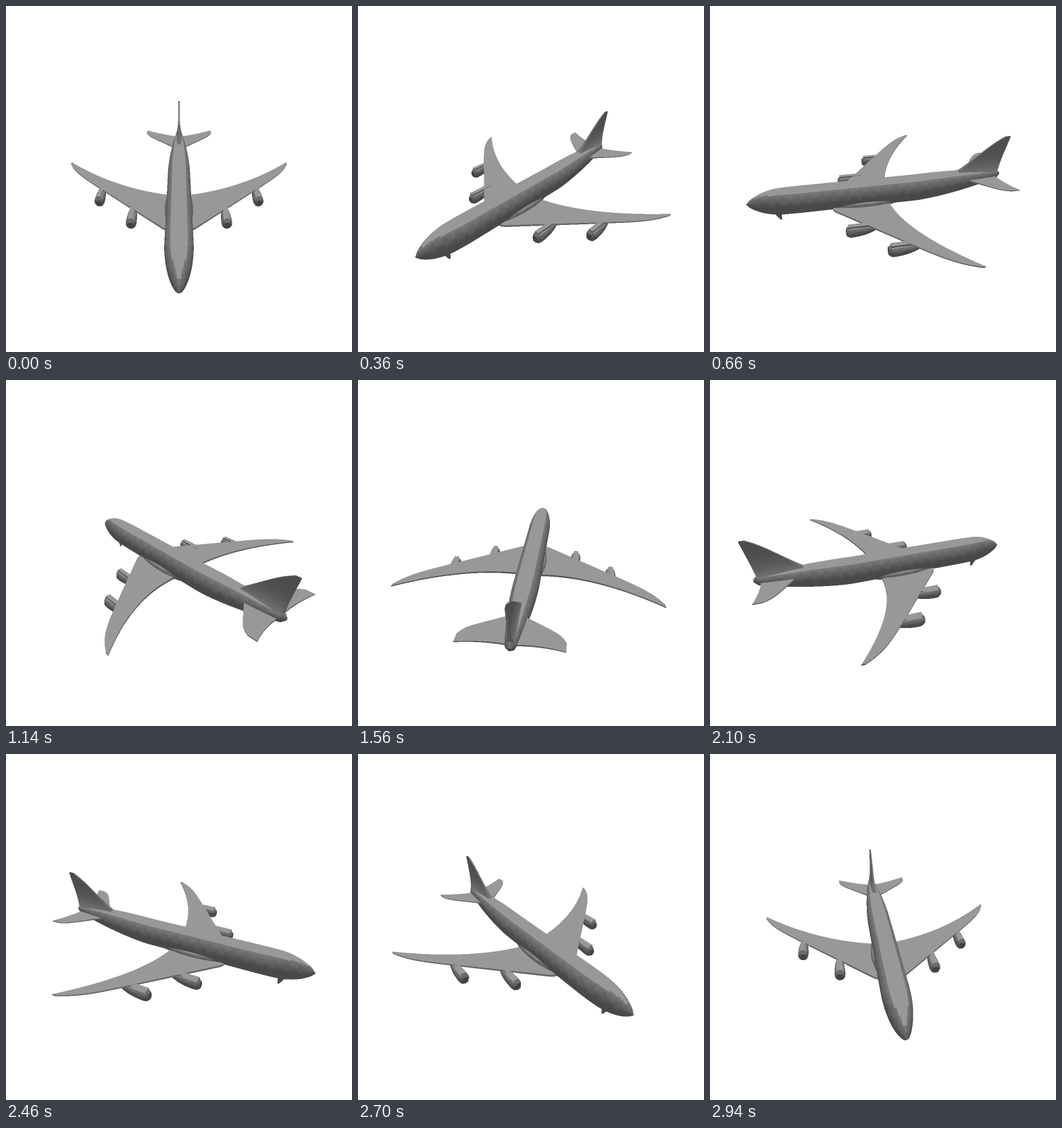
An HTML page with a canvas for the animation above (3000 ms loop, 512 px wide and 512 px high).

```html
<!DOCTYPE html>
<html>
<head>
<meta charset="utf-8">
<style>
html, body { margin: 0; height: 100%; overflow: hidden; background: #fff; }
canvas { display: block; width: 512px; height: 512px; }
</style>
</head>
<body>
<canvas id="stage" width="1024" height="1024"></canvas>
<script>
const SIZE = 1024, FOCAL = 1090, DIST = 2.75, TILT = 31 * Math.PI / 180;
const SIN_T = Math.sin(TILT), COS_T = Math.cos(TILT);
const LIGHT = 152, DARK = 72;
const ctx = document.getElementById('stage').getContext('2d');
const image = ctx.createImageData(SIZE, SIZE);
const pixels = new Uint32Array(image.data.buffer);
const near = new Float32Array(SIZE * SIZE);
const faces = [];

// Points are [forward, sideways, up].
const quad = (shade, ...pts) => faces.push({ shade, pts });
const clamp = v => Math.min(1, Math.max(0, v));
const dome = (n, power) => Math.pow(1 - (1 - clamp(n)) ** 2, power);

// shape(u) gives the centre height and both radii of the ring at u.
function tube(from, to, rings, side, shape, seg = 40) {
  const point = (u, { y, rw, rh }, a) => [u, side + rw * Math.cos(a), y + rh * Math.sin(a)];
  for (let i = 0; i < rings; i++) {
    const u = from + (to - from) * i / rings, v = from + (to - from) * (i + 1) / rings;
    const p = shape(u), q = shape(v);
    const slope = (p.y + p.rh - q.y - q.rh) / (u - v);
    for (let j = 0; j < seg; j++) {
      const a = j / seg * 2 * Math.PI, b = (j + 1) / seg * 2 * Math.PI, m = (a + b) / 2;
      const nw = Math.cos(m) / (p.rw + q.rw), nh = Math.sin(m) / (p.rh + q.rh);
      const up = nh / Math.hypot(nw, nh) / (1 + slope * slope);
      let shade = DARK;
      if (up > 0.72) shade = LIGHT;
      else if (up > 0) shade = DARK + 65 * up + 5 * Math.sin(u * 70) * Math.sin(m * 7);
      quad(shade, point(u, p, a), point(v, p, a).with(0, u), point(v, q, b), point(v, q, a));
      faces.at(-1).pts[1] = point(u, p, b);
    }
  }
}

// rule(k) gives [span, leading edge, trailing edge, half thickness] for k from 0 to 1.
function slab(count, rule, place, shades) {
  const corners = k => {
    const [s, lead, trail, t] = rule(k);
    return [place(s, lead, t), place(s, trail, t), place(s, trail, -t), place(s, lead, -t)];
  };
  for (let i = 0; i < count; i++) {
    const a = corners(i / count), b = corners((i + 1) / count);
    shades(i / count).forEach((shade, j) => {
      const n = (j + 1) % 4;
      quad(shade, a[j], a[n], b[n], b[j]);
    });
  }
  quad(DARK, ...corners(1));
}

const flat = () => [LIGHT, 88, DARK, 100];
const upright = (s, u, o) => [u, o, s];

// Fuselage, then the fairing below the wings
tube(1, -.935, 70, 0, u => {
  const aft = clamp((-.25 - u) / .68);
  const taper = (1 - .7 * aft ** 1.8) * dome((u + .937) / .04, .5);
  return {
    y: -.104 + .054 * aft ** 1.2,
    rw: .001 + .09 * dome((1 - u) / .4, .7) * taper,
    rh: .001 + .103 * dome((1 - u) / .25, .8) * taper
  };
});
tube(.47, -.2, 24, 0, u => {
  const r = .01 + dome((.47 - u) / .335, .7) * (u > .135) + dome((u + .2) / .335, .7) * (u <= .135);
  return { y: -.163, rw: .104 * r, rh: .052 * r };
});

for (const side of [-1, 1]) {
  // Wing
  slab(30, k => {
    const s = .05 + .868 * k;
    return [s, Math.min(.39, .47 - .854 * s) - .08 * k ** 14, -.03 - .46 * s * s, .008 - .004 * k];
  }, (s, u, o) => [u, side * s, -.18 + .102 * s + o], flat);

  // Tailplane
  slab(16, k => {
    const s = .01 + .295 * k;
    return [s, -.62 - .72 * s - .04 * k ** 12, -.888 - .6 * s * s, .006 - .003 * k];
  }, (s, u, o) => [u, side * s, -.065 + .145 * s + o], flat);

  // Engines, each with a pylon on top
  for (const [front, w, y] of [[.32, .338, -.188], [.08, .602, -.165]]) {
    tube(front, front - .21, 12, side * w, u => {
      const k = (front - u) / .21, r = (.6 + .4 * dome(k * 5, .5)) * (1 - .65 * k ** 3);
      return { y: y + .012 * k * k, rw: .038 * r, rh: .044 * r };
    }, 28);
    quad(66, ...[0, 1, 2, 3].map(i => {
      const a = (i + .5) * Math.PI / 2;
      return [front, side * w + .026 * Math.cos(a), y + .03 * Math.sin(a)];
    }));
    slab(1, k => [(k - .5) * .034, front - .015, front - .2, .006],
      (s, u, o) => [u, side * w + s, y + .044 + o], flat);
  }
}

// Tail fin, wide and pale at its foot
slab(16, k => {
  const s = -.03 + .294 * k;
  return [s, -.59 - 1.2 * s - .03 * k ** 8, -.912 - .24 * s, .006 + .022 * (1 - k) ** 5];
}, upright, k => {
  const face = 76 + 40 * (1 - k) ** 3;
  return [face, 84, face, 115];
});

// Mast under the nose
slab(1, k => [-.19 - .075 * k, .825 - .045 * k, .765 + .005 * k, .004], upright, () => Array(4).fill(DARK));

function triangle(a, b, c, color) {
  const area = (b.x - a.x) * (c.y - a.y) - (b.y - a.y) * (c.x - a.x);
  if (!area) return;
  const x0 = Math.max(0, Math.floor(Math.min(a.x, b.x, c.x)));
  const x1 = Math.min(SIZE - 1, Math.ceil(Math.max(a.x, b.x, c.x)));
  const y0 = Math.max(0, Math.floor(Math.min(a.y, b.y, c.y)));
  const y1 = Math.min(SIZE - 1, Math.ceil(Math.max(a.y, b.y, c.y)));
  for (let y = y0; y <= y1; y++) {
    for (let x = x0; x <= x1; x++) {
      const px = x + .5, py = y + .5;
      const wb = ((px - a.x) * (c.y - a.y) - (py - a.y) * (c.x - a.x)) / area;
      const wc = ((b.x - a.x) * (py - a.y) - (b.y - a.y) * (px - a.x)) / area;
      const wa = 1 - wb - wc;
      if (wa < 0 || wb < 0 || wc < 0) continue;
      const d = wa * a.d + wb * b.d + wc * c.d, i = y * SIZE + x;
      if (d > near[i]) {
        near[i] = d;
        pixels[i] = color;
      }
    }
  }
}

function render(angle) {
  const sin = Math.sin(angle), cos = Math.cos(angle);
  const project = ([u, w, y]) => {
    const x = w * cos - u * sin, z = u * cos + w * sin;
    const d = 1 / (DIST - z * COS_T - y * SIN_T);
    return {
      x: SIZE / 2 + FOCAL * x * d,
      y: SIZE / 2 - FOCAL * (y * COS_T - z * SIN_T) * d,
      d
    };
  };
  pixels.fill(0xffffffff);
  near.fill(0);
  for (const { shade, pts } of faces) {
    const [a, b, c, d] = pts.map(project);
    const color = (0xff000000 | Math.round(shade) * 0x010101) >>> 0;
    triangle(a, b, c, color);
    triangle(a, c, d, color);
  }
  ctx.putImageData(image, 0, 0);
}

// One turn in 50 steps of 60 ms
let shown = -1;
function tick() {
  const step = Math.floor(performance.now() / 60) % 50;
  if (step !== shown) {
    shown = step;
    render(step / 50 * 2 * Math.PI);
  }
  requestAnimationFrame(tick);
}
tick();
</script>
</body>
</html>
```
